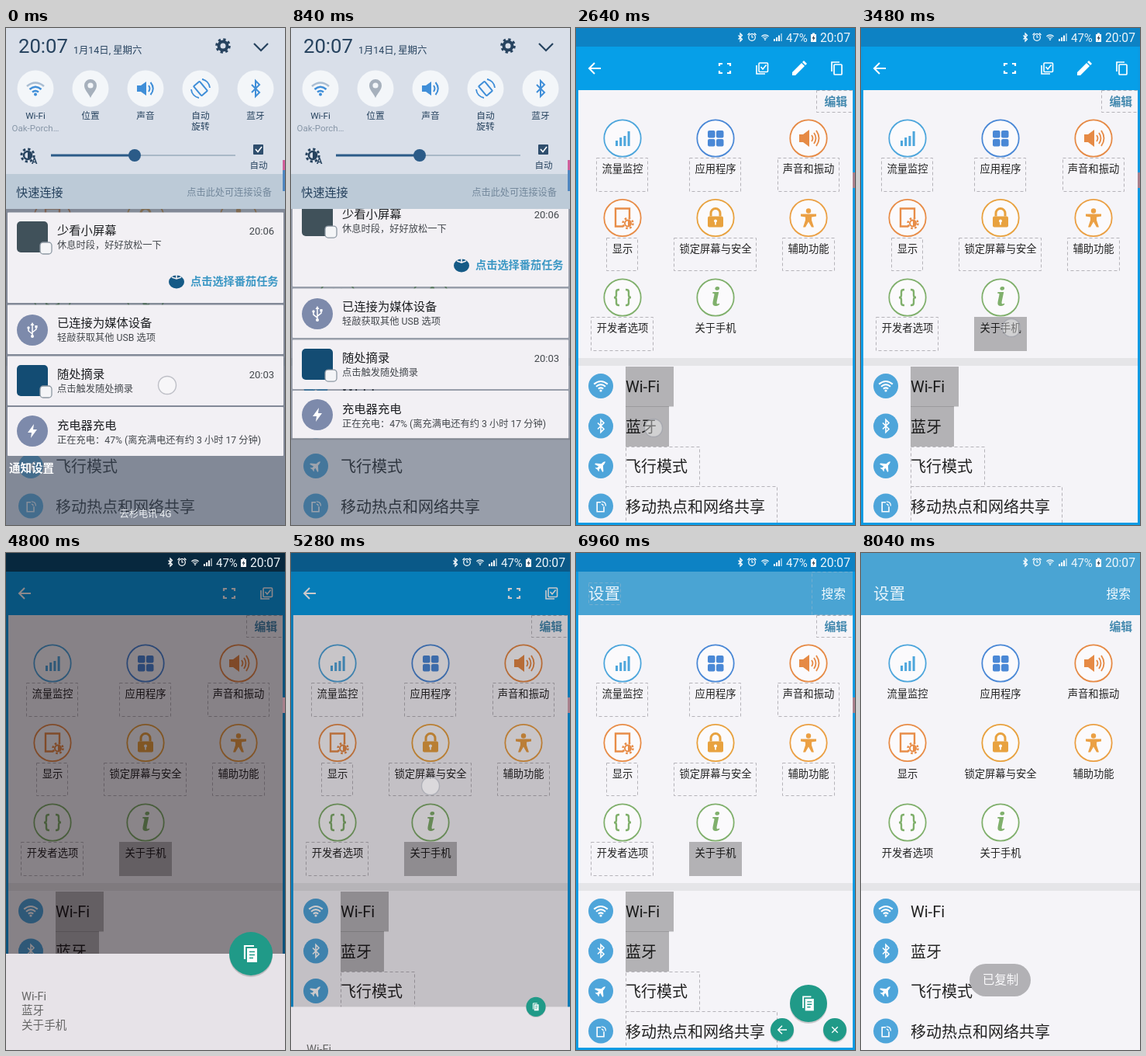
Animation of 360 by 640 pixels, one loop 8.16 s. Source, as an HTML page:

```html
<!DOCTYPE html>
<html lang="zh-CN">
<head>
<meta charset="utf-8">
<style>
html, body { margin: 0; height: 100%; overflow: hidden; background: #f5f4f8; }
svg { display: block; width: 100%; height: 100%; }
text { font-family: Roboto, "Noto Sans CJK SC", "Noto Sans CJK", sans-serif; white-space: pre; }
</style>
</head>
<body>
<svg id="stage" viewBox="0 0 360 640"></svg>
<script>
const LOOP = 8160;
const stage = document.getElementById('stage');

// Markup helpers
const text = (x, y, size, str, fill = '#222', more = '') =>
  `<text x="${x}" y="${y}" font-size="${size}" fill="${fill}" ${more}>${str}</text>`;
const mid = 'text-anchor="middle"', end = 'text-anchor="end"', bold = ' font-weight="700"';
const rect = (x, y, w, h, fill, more = '') =>
  `<rect x="${x}" y="${y}" width="${w}" height="${h}" fill="${fill}" ${more}/>`;
const disc = (x, y, r, fill, more = '') =>
  `<circle cx="${x}" cy="${y}" r="${r}" fill="${fill}" ${more}/>`;
const line = (d, color, w = 2, more = '') =>
  `<path d="${d}" fill="none" stroke="${color}" stroke-width="${w}" ${more}/>`;
const shape = (d, fill) => `<path d="${d}" fill="${fill}"/>`;
const at = (x, y, body, scale = 1, turn = 0) =>
  `<g transform="translate(${x} ${y}) rotate(${turn}) scale(${scale})">${body}</g>`;
const group = (id, body) => `<g id="${id}">${body}</g>`;

// Icons, centred on 0,0
const bluetooth = (c, w = 2) => line('M-5 -5L5 5L0 10V-10L5 -5L-5 5', c, w);
const wifi = (c, outer = c) => line('M-11 -3Q0 -12 11 -3', outer, 2.6) +
  line('M-7.5 1Q0 -5.5 7.5 1M-4 4.5Q0 1.5 4 4.5', c, 2.6) + disc(0, 7.5, 2, c);
const speaker = c => shape('M-12 -5h5l8 -6v22l-8 -6h-5z', c) +
  line('M4 -4Q7 0 4 4M7 -7Q12 0 7 7M10 -10Q17 0 10 10', c, 1.8);
const volume = c => shape('M-11 -4h5l7 -5v18l-7 -5h-5z', c) + line('M4 -4Q7 0 4 4M6.5 -8Q13 0 6.5 8', c, 2);
const gear = c => disc(0, 0, 5.5, 'none', `stroke="${c}" stroke-width="4"`) +
  disc(0, 0, 8.3, 'none', `stroke="${c}" stroke-width="3" stroke-dasharray="3.26"`);
const sun = c => disc(0, 0, 4, 'none', `stroke="${c}" stroke-width="2"`) + shape('M0 -4A4 4 0 0 1 0 4Z', c) +
  disc(0, 0, 6.5, 'none', `stroke="${c}" stroke-width="2.4" stroke-dasharray="2.55"`);
const bars = c => [7, 11, 13, 19].map((h, i) => rect(-9 + i * 5.2, 10 - h, 3, h, c)).join('');
const tiles = c => [[-10, -10], [1, -10], [-10, 1], [1, 1]].map(([x, y]) => rect(x, y, 9.5, 9.5, c, 'rx="2"')).join('');
const screen = c => line('M1 11H-9V-12H9V0', c, 2.4) + at(7, 7, sun(c));
const lock = c => rect(-10, -2, 20, 14, c, 'rx="2"') + line('M-6 -2V-6A6 6 0 0 1 6 -6V-2', c, 3) +
  disc(0, 4, 2, '#fff') + rect(-.8, 4, 1.6, 5, '#fff');
const person = c => disc(0, -9, 3.2, c) + shape('M-10 -5H10V-2L4 -1V3L7 12H4L0 5L-4 12H-7L-4 3V-1L-10 -2Z', c);
const brace = 'M-4 -10H-5Q-8 -10 -8 -7V-3Q-8 0 -11 0Q-8 0 -8 3V7Q-8 10 -5 10H-4';
const braces = c => line(brace, c, 2.4) + at(0, 0, line(brace, c, 2.4), 1, 180);
const info = c => text(0, 11, 33, 'i', c, mid + bold + ' font-style="italic" style="font-family:\'Noto Serif\',serif"');
const plane = c => at(0, 0, shape('M0 -10Q2 -9 2 -3L9 3V5L2 3V6L4 8V9L0 8L-4 9V8L-2 6V3L-9 5V3L-2 -3Q-2 -9 0 -10Z', c), 1, 45);
const hotspot = c => line('M0 -6H-6V9H5V1', c, 2) + line('M1 -3Q4 -3 4 0M1 -7Q8 -7 8 0', c, 1.6);
const arrow = c => line('M8 0H-7M0 -7L-7 0L0 7', c, 2);
const corners = c => line('M-7 -3V-6H-3M3 -6H7V-3M7 3V6H3M-3 6H-7V3', c, 2.2);
const checks = c => line('M-7 -4V7H4', c, 1.6) + rect(-4, -7, 11.5, 11.5, 'none', `stroke="${c}" stroke-width="1.6" rx="1"`) +
  line('M-1.5 -2L1 1L5.5 -4.5', c, 1.6);
const pencil = c => shape('M-9 9V5L3 -7L7 -3L-5 9ZM4 -8L6 -10L10 -6L8 -4Z', c);
const copy = c => line('M-6 4V-8H4', c, 1.7) + rect(-3, -5, 10, 13, 'none', `stroke="${c}" stroke-width="1.7" rx="1"`);
const pages = c => line('M-8 7V-10H4', c, 2.2) + shape('M-5 -7H8V11H-5Z', c) +
  line('M-2 -2.5H5M-2 1.5H5M-2 5.5H3', '#209a88', 1.6);
const cross = c => line('M-5 -5L5 5M5 -5L-5 5', c, 1.8);

// Settings page
const apps = [
  ['流量监控', bars, '#4da6dc'], ['应用程序', tiles, '#4a88d6'], ['声音和振动', speaker, '#e68a45'],
  ['显示', screen, '#e88d48'], ['锁定屏幕与安全', lock, '#e8a23f'], ['辅助功能', person, '#eba044'],
  ['开发者选项', braces, '#80b06c'], ['关于手机', info, '#80b06c']];
const rows = [['Wi-Fi', wifi], ['蓝牙', bluetooth], ['飞行模式', plane], ['移动热点和网络共享', hotspot]];
const page = rect(0, 0, 360, 640, '#f5f4f8') + rect(0, 0, 360, 80, '#4aa4d3') +
  text(16, 60, 20.5, '设置', '#e8f4fb') + text(348, 58, 15.8, '搜索', '#f2f9fd', end) +
  text(350, 100, 14.8, '编辑', '#4288ae', end + bold) +
  apps.map(([name, icon, c], i) => {
    const x = 60 + i % 3 * 120, y = 142 + Math.floor(i / 3) * 102.5;
    return at(x, y, disc(0, 0, 23.7, '#fbfafc', `stroke="${c}" stroke-width="1.8"`) + icon(c)) +
      text(x, y + 44, 13.3, name, '#222', mid);
  }).join('') +
  rect(0, 425, 360, 10, '#e5e5e8') +
  rows.map(([name, icon], i) => {
    const y = 461 + i * 51.5;
    return at(32, y, disc(0, 0, 16, '#4ea5da') + at(0, 0, icon('#fff'), .8)) + text(64, y + 8, 20, name);
  }).join('');

// Text-picking layer: boxes are x, y, w, h
const boxes = [[310.5, 80.5, 47, 28], [26.5, 167.5, 66, 43], [146.5, 167.5, 66, 43], [260.5, 167.5, 79, 43],
  [39.5, 270.5, 40, 42], [126.5, 270.5, 106, 42], [266.5, 270.5, 67, 42], [19.5, 372.5, 80, 43],
  [64.5, 539.5, 95, 51], [64.5, 590.5, 195, 51]];
const titleBoxes = [[16.5, 38.5, 41, 28], [304.5, 24.5, 53, 55]];
const dashed = color => b => rect(...b, 'none', `stroke="${color}" stroke-dasharray="4 3"`);
const picks = [[2060, 64, 436, 62, 51.5], [2560, 64, 487, 56, 52], [3400, 146, 372, 68, 44]];
const picker = boxes.map(dashed('#b5b3b9')).join('') + titleBoxes.map(dashed('#74aecf')).join('') +
  picks.map(([, ...b], i) => group('pick' + i, rect(...b, '#000', 'opacity=".27"'))).join('') +
  group('tools', rect(0, 24, 360, 56, '#069fe8') + at(24, 52, arrow('#fff')) +
    group('shifted', at(192, 52, corners('#fff')) + at(240, 52, checks('#fff'))) +
    group('edits', at(288, 52, pencil('#fff')) + at(336, 52, copy('#fff')))) +
  rect(0, 0, 360, 24, '#0d82c4') + line('M1.5 24V638.5H358.5V24', '#0a9be4', 3);

const status = at(212, 12, bluetooth('#fff', 2.4), .5) +
  at(227, 12, disc(0, 0, 4.3, 'none', 'stroke="#fff" stroke-width="1.2"') + line('M0 -3V0H2M-5.5 -3L-3 -5.5M5.5 -3L3 -5.5', '#fff', 1.1)) +
  at(244, 12, wifi('#fff'), .42) +
  [3, 5, 7.5, 10].map((h, i) => rect(255 + i * 3, 17 - h, 2, h, '#fff', i > 2 ? 'opacity=".5"' : '')).join('') +
  text(271, 17.5, 15, '47%', '#eef6fb') + rect(303, 8, 7, 10, '#fff') + rect(305, 6.5, 3, 2, '#fff') +
  shape('M307.5 9L304.5 13.5H306.5L305.5 17L308.7 12.3H306.7Z', '#234') +
  text(354, 18, 15.7, '20:07', '#eef6fb', end);

const teal = '#209a88';
const sheet = rect(0, 516, 360, 124, '#e7e3e8') +
  ['Wi-Fi', '蓝牙', '关于手机'].map((s, i) => text(20, 576 + i * 18.3, 14.6, s, '#666')).join('');
const fab = r => disc(0, 2, r, '#000', 'opacity=".18"') + disc(0, 0, r, teal) + at(0, 0, pages('#fff'), r / 28);
const mini = icon => disc(0, 1, 15.5, '#000', 'opacity=".15"') + disc(0, 0, 15, teal) + at(0, 0, icon('#fff'), .75);

// Notification shade
const ink = '#27435f', blue = '#3f8ed8';
const rotate = c => at(0, 0, rect(-5, -8, 10, 16, 'none', `stroke="${c}" stroke-width="2" rx="1"`), 1, -40) +
  line('M2 -12A12 12 0 0 1 12 -1M-2 12A12 12 0 0 1 -12 1', c, 1.8);
const pin = () => shape('M0 12C-3 5 -8 2 -8 -4A8 8 0 0 1 8 -4C8 2 3 5 0 12Z', '#a6b0bc') + disc(0, -4, 3.6, '#f3f6f9');
const quick = [['Wi-Fi', c => wifi(c, '#a9bdd2')], ['位置', pin], ['声音', volume], ['自动', rotate], ['蓝牙', bluetooth]];
const header = rect(0, 0, 360, 188, '#d9dfe9') + rect(0, 188, 360, 45, '#bccad7') +
  text(16, 32, 25.7, '20:07', ink) + text(87, 33, 12.4, '1月14日, 星期六', ink) +
  at(280, 23, gear(ink)) + line('M320 20L329 29L338 20', ink, 2.2) +
  quick.map(([name, icon], i) => at(38 + i * 71, 78, disc(0, 0, 23.5, '#f3f6f9') + icon(blue)) +
    text(38 + i * 71, 117, 11.7, name, ink, mid)).join('') +
  text(38, 133, 11.5, 'Oak-Porch…', '#8796a7', mid) + text(251, 131, 11.7, '旋转', ink, mid) +
  at(28, 164, sun(ink), 1.25) + text(33, 175, 11, 'A', ink, bold) +
  line('M58 164H296', '#a9b8c7', 2) + line('M58 164H166', '#2b5b88', 3) + disc(166, 164, 8, '#2b5b88') +
  rect(319, 150, 13, 13, '#2f4e6d', 'rx="1"') + line('M322 156L325 159.5L330 153', '#fff', 1.6) +
  text(326, 181, 11.5, '自动', ink, mid) +
  text(13, 217, 15.2, '快速连接', ink) + text(343, 216, 12.2, '点击此处可连接设备', '#72879b', end);
const card = (y, h, title, sub, time = '') => rect(2, y, 356, h, '#f2f0f4', 'rx="1"') +
  text(66, y + 28.8, 15.3, title, '#1d1f22') + text(66, y + 46.6, 12.25, sub, '#44484d') +
  text(346, y + 28.8, 13, time, '#44484d', end);
const appIcon = (y, c) => rect(14, y, 40, 40, c, 'rx="5"') +
  rect(44, y + 27, 15, 15, '#f4f5f7', 'rx="4" stroke="#8d98a3" stroke-width="1.3"');
const cards = card(237.5, 116.5, '少看小屏幕', '休息时段，好好放松一下', '20:06') + appIcon(249, '#40515a') +
  at(220, 327, `<ellipse rx="10" ry="8.5" fill="#155a86"/>` + line('M-6 -6L0 -4L6 -6M0 -4V-10', '#f2f0f4', 1.6)) +
  text(238, 331, 14.2, '点击选择番茄任务', '#3b97c4', bold) +
  card(356.5, 63.5, '已连接为媒体设备', '轻敲获取其他 USB 选项') + disc(34, 389, 20, '#7d8aab') +
  at(34, 389, line('M0 8V-8M0 5L-5 1V-3M0 3L5 -1V-4', '#fff', 1.5) + shape('M-2.5 -6L0 -10L2.5 -6Z', '#fff') +
    disc(0, 8, 2, '#fff') + disc(-5, -3, 1.7, '#fff') + rect(3.4, -6, 3.2, 3.2, '#fff')) +
  card(422.5, 63.5, '随处摘录', '点击触发随处摘录', '20:03') + appIcon(434, '#134c73') +
  card(488, 63, '充电器充电', '正在充电：47% (离充满电还有约 3 小时 17 分钟)') + disc(34, 519, 20, '#7d8aab') +
  at(34, 519, shape('M2 -9L-6 2H-1L-2 9L6 -2H1Z', '#fff')) +
  text(4, 572, 14.5, '通知设置', '#fff', bold) + text(180, 629.5, 12.2, '云杉电讯 4G', '#eef1f4', mid);

stage.innerHTML = '<clipPath id="cut"><rect id="cutBox" width="360" height="640"/></clipPath>' +
  page + group('picker', picker) +
  group('dim', rect(0, 0, 360, 640, '#0c0008', 'opacity=".47"') + rect(0, 0, 360, 24, '#000', 'opacity=".42"')) +
  status + group('sheet', sheet) + group('sheetFab', fab(28)) +
  group('back', mini(arrow)) + group('close', mini(cross)) + group('fab', fab(24)) +
  group('toast', rect(140, 529, 79, 42, '#77777a', 'rx="21"') + text(180, 555, 15.5, '已复制', '#fff', mid)) +
  group('shade', rect(0, 0, 360, 640, '#3c4a5c', 'opacity=".62"')) +
  `<g clip-path="url(#cut)">${group('cards', cards)}${header}</g>` +
  group('lip', rect(0, 0, 360, 2, '#000', 'opacity=".15"')) +
  group('edge', rect(357, 170, 3, 13, '#d0609c') + rect(357, 183, 3, 27, '#4f86c0')) +
  group('edgeTip', rect(357, 186, 3, 20, '#a8808c')) +
  group('touch', disc(0, 0, 11.5, '#fff', 'fill-opacity=".4" stroke="#9a9ca6" stroke-opacity=".6" stroke-width="1.4"'));

const el = {};
stage.querySelectorAll('[id]').forEach(e => el[e.id] = e);
const ramp = (t, a, b) => Math.min(1, Math.max(0, (t - a) / (b - a)));
const ease = p => 1 - (1 - p) ** 3;
const fade = (id, a) => {
  el[id].setAttribute('opacity', a);
  el[id].style.display = a > 0 ? '' : 'none';
};
const move = (id, x, y, s = 1) => el[id].setAttribute('transform', `translate(${x} ${y}) scale(${s})`);

// Start time, x, y
const taps = [[-60, 208, 460], [1980, 95, 462], [2460, 100, 515], [3310, 194, 386], [4160, 288, 52],
  [5160, 180, 300], [5740, 200, 55], [7420, 300, 580]];

function draw(t) {
  // Shade collapses upwards
  const left = (1 - ramp(t, 780, 1320)) ** 1.6, h = 640 * left;
  el.cutBox.setAttribute('height', h);
  fade('cards', ramp(left, .15, .7));
  move('cards', 0, -120 * (1 - left));
  fade('shade', ramp(left, .1, 1));
  fade('lip', h > 0 && h < 640 ? 1 : 0);
  move('lip', 0, h);
  fade('edge', t < 1700 ? 1 : 0);
  fade('edgeTip', t >= 1700 && t < 7600 ? 1 : 0);

  fade('picker', ramp(t, 1560, 1760) * (1 - ramp(t, 7600, 7760)));
  picks.forEach(([start], i) => fade('pick' + i, t >= start ? 1 : 0));

  // Preview sheet
  const up = ease(ramp(t, 4300, 4600)) * (1 - ease(ramp(t, 5220, 5480)));
  const open = t >= 4300 && t < 5300;
  move('shifted', open ? 96 : 0, 0);
  fade('edits', open ? 0 : 1);
  fade('dim', up);
  fade('sheet', up > 0 ? 1 : 0);
  move('sheet', 0, 124 * (1 - up));
  fade('sheetFab', up > 0 ? 1 : 0);
  move('sheetFab', 316, 516 + 124 * (1 - up), up);

  // Full screen mode with floating buttons
  const full = ease(ramp(t, 5780, 6020)), gone = 1 - ramp(t, 7560, 7720);
  fade('tools', 1 - full);
  fade('fab', full > 0 ? gone : 0);
  move('fab', 300, 580, full * gone);
  [['back', -34], ['close', 34]].forEach(([id, dx]) => {
    fade(id, full > 0 ? gone : 0);
    move(id, 300 + dx * full * gone, 580 + 34 * full * gone, full * gone);
  });

  fade('toast', .9 * ramp(t, 7900, 8140));

  const tap = taps.find(([s]) => t >= s && t < s + 400);
  fade('touch', tap ? 1 - ramp(t, tap[0] + 200, tap[0] + 400) : 0);
  if (tap) move('touch', tap[1], tap[2]);
}

const start = performance.now();
function tick() {
  draw((performance.now() - start) % LOOP);
  requestAnimationFrame(tick);
}
draw(0);
requestAnimationFrame(tick);
</script>
</body>
</html>
```
